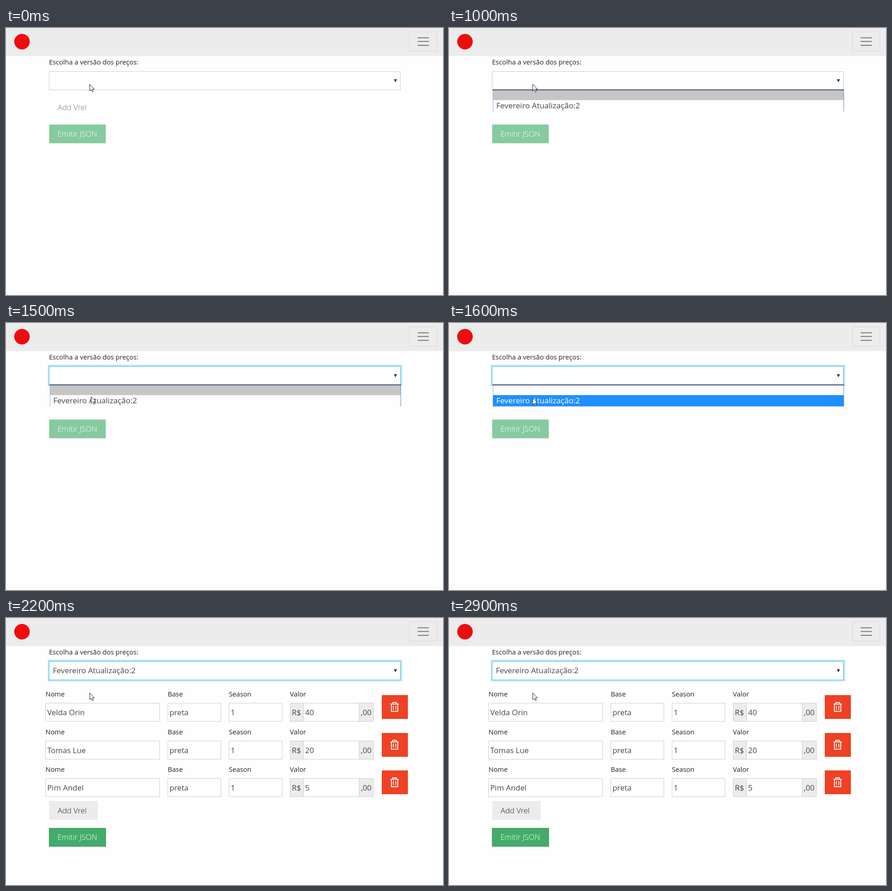
Recreate the animation shown at these times as an HTML page. Size 957 by 585 pixels, loop 3.3 s.

```html
<!DOCTYPE html>
<html lang="pt">
<head>
<meta charset="utf-8">
<title>Versão dos preços</title>
<style>
  html, body { margin: 0; width: 100%; height: 100%; overflow: hidden; background: #fefefe; }
  svg { display: block; width: 957px; height: 585px; }
  text { font-family: "Open Sans", sans-serif; font-size: 16.9px; fill: #484848; white-space: pre; }
  .label { font-size: 14.7px; fill: #222; }
  .light { font-weight: 300; }
</style>
</head>
<body>
<svg id="stage" viewBox="0 0 957 585"></svg>
<script>
const stage = document.getElementById("stage");
const LOOP = 3300;
const OPEN = 1000, FOCUS = 1100, MOVE = 1500, HOVER = 1600, PICK = 2200;
const OPTION = "Fevereiro Atualização:2";
const ITEMS = [["Velda Orin", 40], ["Tomas Lue", 20], ["Pim Andel", 5]];

const rect = (x, y, w, h, fill, extra = "") =>
  `<rect x="${x}" y="${y}" width="${w}" height="${h}" fill="${fill}" ${extra}/>`;
const box = (x, y, w, h, fill = "#fff", stroke = "#ccc") =>
  rect(x + .5, y + .5, w - 1, h - 1, fill, `stroke="${stroke}"`);
const text = (x, y, s, cls = "", fill = "") =>
  `<text x="${x}" y="${y}" class="${cls}"${fill && ` style="fill:${fill}"`}>${s}</text>`;
const line = (d, color, width = 1) =>
  `<path d="${d}" fill="none" stroke="${color}" stroke-width="${width}"/>`;

function header() {
  return rect(0, 0, 957, 61.5, "#ececec") +
    `<circle cx="35" cy="30" r="17" fill="#f00c0c"/>` +
    box(883, 8, 61, 43, "none", "#d6d6d6") +
    line("M901.5 21.5h24.5M901.5 29.5h24.5M901.5 38h24.5", "#777", 2) +
    text(94.2, 80, "Escolha a versão dos preços:", "label");
}

function select(border, focused, value) {
  return (focused ? rect(91.5, 91.5, 776, 47, "#b5e3f4") : "") +
    box(94, 95, 770, 41, "#fff", border) +
    `<path d="M849.3 112.3h7l-3.5 6.8z" fill="#333"/>` +
    text(102.4, 121, value);
}

function list(hovered) {
  return rect(95, 135, 770, 48, "#fefefe") +
    line("M96.5 136V183", "#92add6") +
    line("M864.5 136V183", "#5b83d6") +
    line("M95 136.5H865", "#a9c3ea") +
    line("M95 135.5H865", "#14213a", 1.4) +
    (hovered
      ? rect(96, 158, 768, 24, "#1e90ff") + line("M96 182.5H865", "#7da3da")
      : rect(97, 137, 767, 21, "#c6c6c6")) +
    `<g style="font-size:17.1px"><text x="103.4" y="176" style="font-size:inherit${hovered ? ";fill:#fff" : ""}">${OPTION}</text></g>`;
}

function trash(x, y) {
  return `<g transform="translate(${x} ${y})">` +
    line("M-9 -6.5H9M-4 -7V-10H4V-7M-7 -6V9.5H7V-6", "#fff", 2) +
    line("M-2.7 -3V6M2.7 -3V6", "#fff", 1.6) + "</g>";
}

function item([name, price], i) {
  const y = Math.round(i * 82.6);
  const labels = [[86.6, "Nome"], [354.2, "Base"], [488, "Season"], [621.8, "Valor"]];
  return `<g transform="translate(0 ${y})">` +
    labels.map(([x, s]) => text(x, 172, s, "label")).join("") +
    box(86, 186, 251, 41) + text(90.2, 212.5, name) +
    box(354, 186, 117, 41) + text(358, 212.5, "preta") +
    box(488, 186, 117, 41) + text(492, 212.5, "1") +
    box(622, 186, 30, 41, "#ececec") + text(626, 212.5, "R$") +
    box(651, 186, 123, 41) + text(655, 212.5, price) +
    box(773, 186, 32, 41, "#ececec") + text(777, 212.5, ",00") +
    box(823, 169, 57, 52, "#f04124", "#e53a1e") + trash(851, 195) + "</g>";
}

function buttons(y, enabled) {
  const add = enabled ? rect(94.5, y, 106.5, 41, "#ececec") : "";
  return add + text(113, y + 26.5, "Add Vrel", "light", enabled ? "#222" : "#777") +
    (enabled ? box(94, y + 59, 125, 41, "#43ac6a", "#3c9a5f") : rect(94.5, y + 58.5, 124, 41, "#86ca9f")) +
    text(112.7, y + 85, "Emitir JSON", "light", "#fff");
}

function cursor(t) {
  const [x, y] = t < MOVE ? [183.5, 123.5] : t < HOVER ? [186.5, 161.5] : [183.5, 164.5];
  return `<path transform="translate(${x} ${y})" d="M0 0V14.5L3.3 11.4L5.6 16.5L7.9 15.5L5.6 10.5H10.2Z" fill="#fff" stroke="#1c1c2c"/>`;
}

function render(t) {
  const picked = t >= PICK;
  const border = t < OPEN ? "#ccc" : t < FOCUS ? "#b5cfcf" : "#5fc6ea";
  return header() +
    (picked ? ITEMS.map(item).join("") : "") +
    buttons(picked ? 401 : 153, picked) +
    select(border, t >= FOCUS, picked ? OPTION : "") +
    (t >= OPEN && !picked ? list(t >= HOVER) : "") +
    cursor(t);
}

const start = performance.now();
let shown = "";
function tick() {
  const next = render((performance.now() - start) % LOOP);
  if (next !== shown) stage.innerHTML = shown = next;
  requestAnimationFrame(tick);
}
tick();
</script>
</body>
</html>
```
